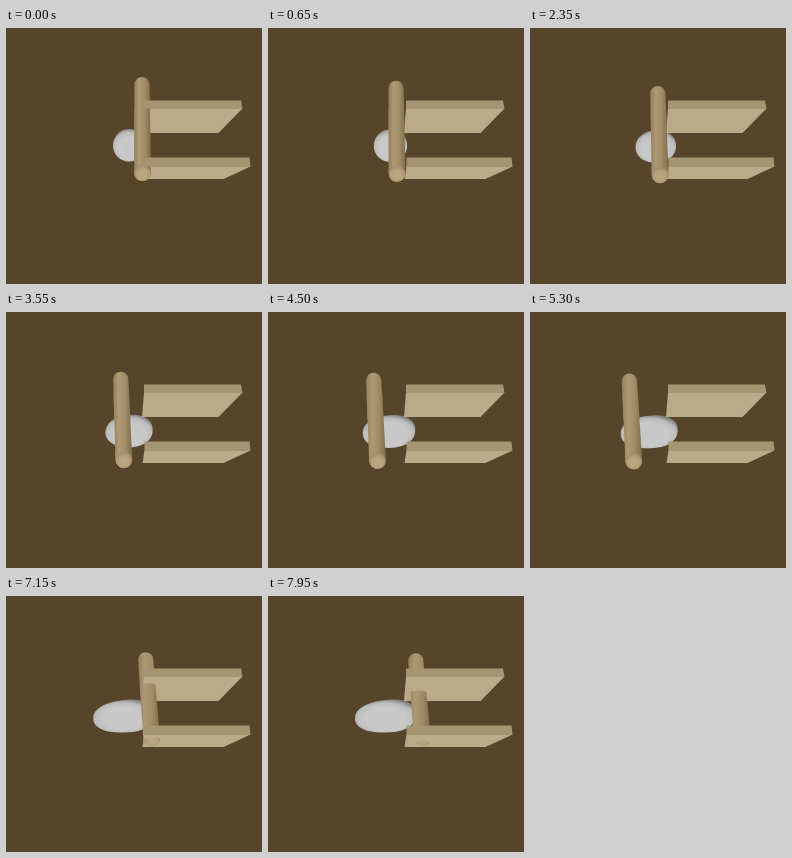
Animation of 256x256 px, one loop 8 s. Source, as an HTML page:

```html
<!DOCTYPE html>
<html lang="en">
<head>
<meta charset="utf-8">
<title>Rolling pin</title>
<style>
  html, body { margin: 0; width: 100%; height: 100%; overflow: hidden; background: #57452b; }
  svg { display: block; width: 100vw; height: 100vh; }
</style>
</head>
<body>
<svg viewBox="0 0 256 256">
  <defs>
    <linearGradient id="wood">
      <stop offset="0" stop-color="#937e5a"/>
      <stop offset=".3" stop-color="#af9a74"/>
      <stop offset=".65" stop-color="#a08b66"/>
      <stop offset="1" stop-color="#7f6b4a"/>
    </linearGradient>
    <radialGradient id="cap" cx=".5" cy=".6" r=".55">
      <stop offset="0" stop-color="#bda883"/>
      <stop offset=".6" stop-color="#b8a27c"/>
      <stop offset="1" stop-color="#a48e69"/>
    </radialGradient>
    <radialGradient id="doughFill" cx=".5" cy=".58" r=".6">
      <stop offset="0" stop-color="#c6c6c6"/>
      <stop offset=".55" stop-color="#c9c9c9"/>
      <stop offset=".8" stop-color="#bcbcbc"/>
      <stop offset="1" stop-color="#7c7c7c"/>
    </radialGradient>
    <clipPath id="front"><path id="frontShape"/></clipPath>
    <g id="pin">
      <path id="shaft" fill="url(#wood)"/>
      <circle id="tip" fill="url(#cap)"/>
    </g>
  </defs>
  <rect width="256" height="256" fill="#57452b"/>
  <path id="dough" fill="url(#doughFill)"/>
  <use href="#pin"/>
  <g fill="#bbaa89">
    <path d="M138 80.5H236.500L212.500 105H136Z"/>
    <path d="M138.500 138.500H244.500L217.500 151H136.500Z"/>
  </g>
  <g fill="#a79473">
    <path d="M138 72.500H235L236.500 81H138Z"/>
    <path d="M138.500 129.500H243.500L244.500 139H138.500Z"/>
  </g>
  <g clip-path="url(#front)"><use href="#pin"/></g>
</svg>
<script>
const LOOP = 8000, STEP = 50;
const $ = id => document.getElementById(id);
const mix = (a, b, u) => a + (b - a) * u;
const easeOut = u => 1 - (1 - u) ** 1.3;

// Turning points: press left, roll back, press left, lift back, sink into the boards.
const poses = [
  { at: 0,    x: 136,   top: 56.5, bottom: 144.5, left: 107,   right: 139 },
  { at: 1800, x: 118,   top: 65,   bottom: 146,   left: 103.5, right: 139.5 },
  { at: 2250, x: 129,   top: 65.5, bottom: 146.5, left: 106,   right: 146 },
  { at: 5930, x: 96,    top: 69.5, bottom: 149,   left: 87.5,  right: 148 },
  { at: 6350, x: 128.5, top: 62,   bottom: 143.2, left: 87.5,  right: 148 },
  { at: 8000, x: 148,   top: 65,   bottom: 141.5, left: 87,    right: 148 }
];

function poseAt(t) {
  const i = poses.findIndex(p => p.at > t), a = poses[i - 1], b = poses[i];
  const u = (t - a.at) / (b.at - a.at), e = easeOut(u);
  return {
    x: mix(a.x, b.x, e), top: mix(a.top, b.top, e), bottom: mix(a.bottom, b.bottom, e),
    left: mix(a.left, b.left, u), right: mix(a.right, b.right, u)
  };
}

// A sphere that is drawn out into a skewed, blunter egg.
function doughPath(left, right, cy) {
  const cx = (left + right) / 2, rx = (right - left) / 2, ry = 16.3;
  const stretch = Math.min(1, (rx - 16) / 14);
  const power = 2 / (2 + .3 * stretch);
  const bend = v => Math.sign(v) * Math.abs(v) ** power;
  let d = "";
  for (let i = 0; i < 48; i++) {
    const a = i * Math.PI / 24, x = bend(Math.cos(a)), y = bend(Math.sin(a));
    const height = ry * (1 + .08 * stretch * x) * y - 2 * stretch * x;
    d += (i ? "L" : "M") + (cx + rx * x).toFixed(2) + " " + (cy + height).toFixed(2);
  }
  return d + "Z";
}

function draw(t) {
  const { x, top, bottom, left, right } = poseAt(t);
  const tipX = x + .5 + 6 * t / LOOP, r = 7.6, tipR = 8.4;
  const axis = y => mix(x, tipX, (y - top) / (bottom - top));

  $("dough").setAttribute("d", doughPath(left, right, 117.3 + 3 * Math.min(1, t / 5930)));
  $("shaft").setAttribute("d",
    `M${x - r} ${top}A${r} ${r} 0 0 1 ${x + r} ${top}` +
    `L${tipX + tipR} ${bottom}A${tipR} ${tipR} 0 0 1 ${tipX - tipR} ${bottom}Z`);
  $("tip").setAttribute("cx", tipX);
  $("tip").setAttribute("cy", bottom + .5);
  $("tip").setAttribute("r", tipR - .3);

  // The pin emerges from the faces of the two boards along curved seams.
  const seam = (y, end) => {
    const cx = axis(y);
    return `M${cx - 9} ${y}A9 2 0 0 1 ${cx + 9} ${y}L${cx + 12} ${end}H${cx - 12}Z`;
  };
  const sink = Math.max(0, (t - 6350) / 1650);
  $("frontShape").setAttribute("d", seam(82 + 15 * sink, 107) + seam(140 + 8 * sink, 160));
}

const start = performance.now();
function tick() {
  const t = (performance.now() - start) % LOOP;
  draw(Math.floor(t / STEP) * STEP);
  requestAnimationFrame(tick);
}
tick();
</script>
</body>
</html>
```
